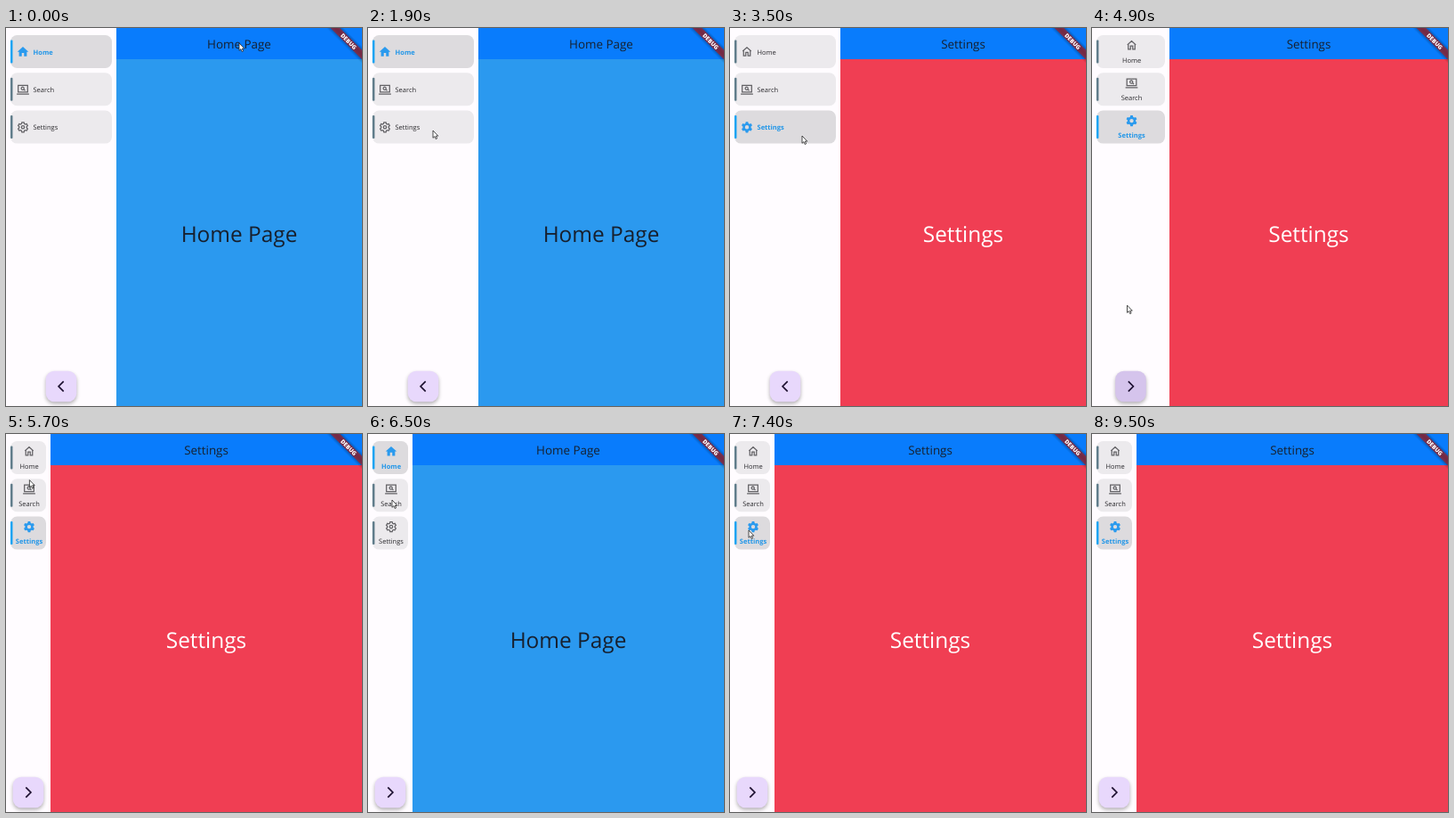
Animation, 400 px wide and 424 px high, one loop 9.6 s. Source, as an HTML page:

```html
<!DOCTYPE html>
<html lang="en">
<head>
<meta charset="utf-8">
<title>Sidebar demo</title>
<style>
  html, body { margin: 0; width: 100%; height: 100%; overflow: hidden; }
  svg { display: block; width: 400px; height: 424px; }
  text { font-family: "Open Sans", "Noto Sans", sans-serif; text-rendering: geometricPrecision; }
  .mid { text-anchor: middle; }
  .box { fill: #eceaed; }
  .bar { fill: #607d8b; }
  .label { font-size: 7.5px; fill: #2b2a2e; }
  .icon { fill: none; stroke: #626165; stroke-width: 2; }
  .icon .solid { display: none; fill: #2a9aee; stroke: none; fill-rule: evenodd; }
  .on .box { fill: #dddbde; }
  .on .bar { fill: #1ea4f2; }
  .on .label { fill: #2196e8; font-weight: 700; }
  .on .line { display: none; }
  .on .icon .solid { display: inline; }
</style>
</head>
<body>
<svg viewBox="0 0 400 424">
  <defs>
    <filter id="soft" x="-30%" y="-30%" width="160%" height="170%"><feGaussianBlur stdDeviation="2"/></filter>
  </defs>
  <rect width="400" height="424" fill="#fffcff"/>
  <rect id="page" y="35" width="400" height="389"/>
  <rect id="head" width="400" height="35" fill="#097cfc"/>
  <text id="title" class="mid" y="22.8" font-size="13.4" fill="#17202e"></text>
  <text id="big" class="mid" y="240" font-size="24.4"></text>

  <g transform="translate(400 0) rotate(45)">
    <rect x="-30" y="17.5" width="60" height="7.5" opacity=".5" filter="url(#soft)"/>
    <rect x="-30" y="17.5" width="60" height="7.5" fill="#b71c1c" opacity=".63"/>
    <text class="mid" y="23.6" font-size="6.5" font-weight="800" fill="#fff">DEBUG</text>
  </g>

  <g id="menu"></g>

  <g id="button">
    <rect x="-17.3" y="-15" width="34.6" height="34.6" rx="9.5" opacity=".3" filter="url(#soft)"/>
    <rect id="face" x="-17.3" y="-17.3" width="34.6" height="34.6" rx="9.5"/>
    <path id="arrow" d="M2.7 -5.6L-2.9 0L2.7 5.6" fill="none" stroke="#1c1030" stroke-width="1.7"/>
  </g>

  <path id="cursor" d="M0 0V8.3L1.9 6.6L3.2 9.5L4.6 8.9L3.3 6.1H5.8Z" fill="#fff" stroke="#222" stroke-width=".8"/>
</svg>
<script>
const LOOP = 9600, STEP = 100, WIDE = 124, SLIM = 50;
const $ = id => document.getElementById(id);
const set = (el, attrs) => { for (const k in attrs) el.setAttribute(k, attrs[k]); };

// Six-toothed cog around the centre of a 24-unit icon
function cog(outer, root) {
  const at = (r, deg) => {
    const a = deg * Math.PI / 180;
    return (12 + r * Math.sin(a)).toFixed(2) + ' ' + (12 - r * Math.cos(a)).toFixed(2);
  };
  const pts = [];
  for (let a = 0; a < 360; a += 60)
    pts.push(at(root, a - 21), at(outer, a - 12), at(outer, a + 12), at(root, a + 21));
  return 'M' + pts.join('L') + 'Z';
}
const ring = r => `M${12 - r} 12a${r} ${r} 0 1 0 ${2 * r} 0a${r} ${r} 0 1 0 ${-2 * r} 0Z`;

const items = [
  { name: 'Home',
    line: 'M4.4 11L12 4.3L19.6 11M6 10V19H10V13H14V19H18V10',
    solid: 'M10 20v-6h4v6h5v-8h3L12 3 2 12h3v8z' },
  { name: 'Search',
    line: 'M3.5 4.5H20.5V16.5H3.5ZM1 20H23M9 10a2.5 2.5 0 1 0 5 0a2.5 2.5 0 1 0 -5 0M13.5 11.5L16 14',
    solid: '' },
  { name: 'Settings',
    line: cog(9, 6.8) + ring(2.7),
    solid: cog(10, 7.5) + ring(3.5) }
];

$('menu').innerHTML = items.map((it, i) => `
  <g transform="translate(0 ${8 + i * 42.3})">
    <rect class="box" x="5" width="114" height="37" rx="7.5"/>
    <rect class="bar" x="5" y="5.5" width="2.5" height="26" rx="1"/>
    <g class="icon"><path class="line" d="${it.line}"/><path class="solid" d="${it.solid}"/></g>
    <text class="label">${it.name}</text>
  </g>`).join('');
const rows = [...$('menu').children].map(g => ({
  g, box: g.querySelector('.box'), icon: g.querySelector('.icon'), label: g.querySelector('.label')
}));

const pages = {
  0: { title: 'Home Page', fill: '#2b99ef', ink: '#17202e' },
  2: { title: 'Settings', fill: '#f03e53', ink: '#fff' }
};
const visits = [[0, 0], [2700, 2], [6200, 0], [7200, 2]];

// time, x, y of the pointer
const path = [
  [0, 262, 17], [400, 262, 17], [1000, 150, 72], [1500, 74, 108], [1900, 73, 115],
  [2700, 78, 119], [3500, 81, 121], [3700, 80, 130], [4300, 62, 400], [4600, 61, 401],
  [4900, 39.5, 311], [5500, 28, 70], [6000, 24, 24], [6200, 24, 26], [6500, 27, 74],
  [7000, 21, 106], [7400, 21, 108], [8100, 23, 110], [8800, 404, 90]
];

function pointer(t) {
  const i = path.findIndex(p => p[0] > t);
  if (i < 0) return null;
  const [t0, x0, y0] = path[i - 1], [t1, x1, y1] = path[i];
  const k = (t - t0) / (t1 - t0);
  return [x0 + (x1 - x0) * k, y0 + (y1 - y0) * k];
}

function draw(t) {
  const slide = Math.min(1, Math.max(0, (t - 4700) / 400));
  const side = WIDE + (SLIM - WIDE) * slide;
  const slim = t >= 4700;
  const current = visits.filter(v => v[0] <= t).pop()[1];
  const page = pages[current];
  const mid = (side + 400) / 2;

  set($('page'), { x: side, fill: page.fill });
  set($('head'), { x: side });
  set($('title'), { x: mid });
  set($('big'), { x: mid, fill: page.ink });
  $('title').textContent = $('big').textContent = page.title;

  const cx = side / 2 + 1;
  rows.forEach((r, i) => {
    set(r.g, { class: i === current ? 'on' : '' });
    set(r.box, { width: side - 10 });
    const [x, y] = slim ? [cx, 11.5] : [19, 18.7];
    set(r.icon, { transform: `translate(${x - 7.5} ${y - 7.5}) scale(.625)` });
    set(r.label, slim
      ? { x: cx, y: 30.6, 'text-anchor': 'middle' }
      : { x: 30.5, y: 21.5, 'text-anchor': 'start' });
  });

  set($('button'), { transform: `translate(${side / 2} 402)` });
  set($('face'), { fill: t >= 4600 && t < 5100 ? '#d5c4ec' : '#e8d8fc' });
  set($('arrow'), { transform: slim ? 'scale(-1 1)' : '' });

  const p = pointer(t);
  set($('cursor'), p
    ? { visibility: 'visible', transform: `translate(${p[0]} ${p[1]})` }
    : { visibility: 'hidden' });
}

const start = performance.now();
function tick() {
  const t = (performance.now() - start) % LOOP;
  draw(Math.floor(t / STEP) * STEP);
  requestAnimationFrame(tick);
}
tick();
</script>
</body>
</html>
```
